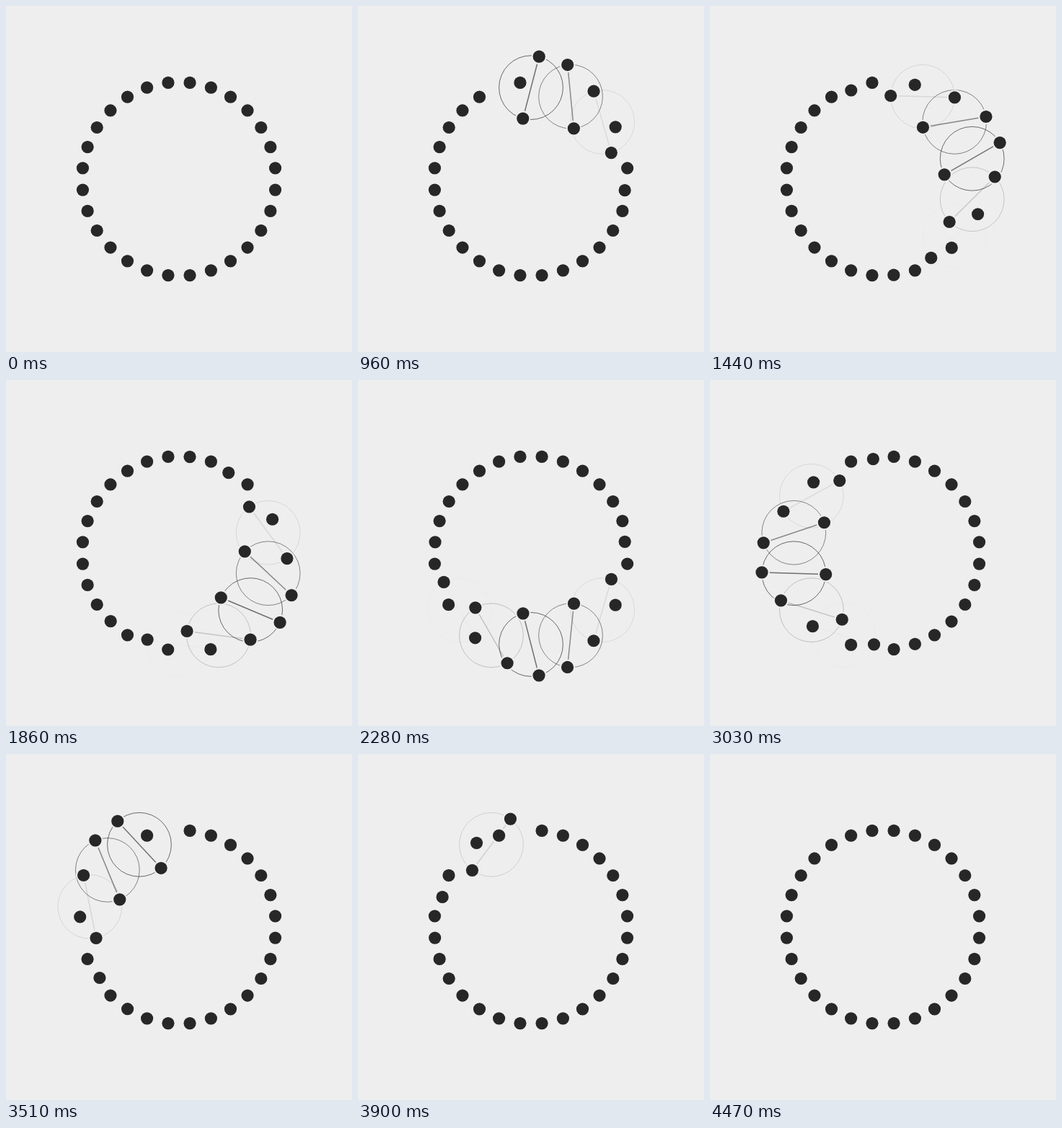
These frames come from a looping animation (480 by 480 pixels, 5.17 s). An HTML page with a canvas:

```html
<!DOCTYPE html>
<html lang="en">
<head>
<meta charset="utf-8">
<title>Swapping dots</title>
<style>
  html, body { margin: 0; width: 100%; height: 100%; overflow: hidden; background: #eee; }
  canvas { display: block; width: 480px; height: 480px; }
</style>
</head>
<body>
<canvas id="stage"></canvas>
<script>
const SIZE = 480, MID = SIZE / 2;
const LOOP = 5170, STEP = 30, MOVE_START = 60, MOVE_END = 4470;
const PAIRS = 14, FIRST = 1, STAGGER = 207, TURN = 1788;
const RING = 134.4, DOT = 8.6, HALO = 10.6;
const BG = '#eee', INK = '#272727';

// Each pair sits three places apart on the ring; its orbit is centred between them.
const UNIT = Math.PI / PAIRS;
const HUB = RING * Math.cos(1.5 * UNIT);
const ORBIT = RING * Math.sin(1.5 * UNIT);

const canvas = document.getElementById('stage');
const ctx = canvas.getContext('2d');
const scale = window.devicePixelRatio || 1;
canvas.width = canvas.height = SIZE * scale;
ctx.scale(scale, scale);

const clamp = x => Math.min(1, Math.max(0, x));
const smooth = x => x * x * (3 - 2 * x);
const ease = x => smooth(smooth(clamp(x)));

function disc(x, y, r, color) {
  ctx.fillStyle = color;
  ctx.beginPath();
  ctx.arc(x, y, r, 0, 2 * Math.PI);
  ctx.fill();
}

function pairAt(i, time) {
  const p = ease((time - FIRST - i * STAGGER) / TURN);
  const around = 2 * i * UNIT;
  const angle = Math.PI + around + p * Math.PI;
  return {
    p,
    x: MID + HUB * Math.sin(around),
    y: MID - HUB * Math.cos(around),
    dx: Math.cos(angle),
    dy: Math.sin(angle)
  };
}

function drawOrbit({ p, x, y, dx, dy }) {
  const fade = Math.sin(Math.PI * p) ** 2;
  if (fade < 0.004) return;
  const reach = ORBIT - HALO;
  ctx.strokeStyle = INK;

  ctx.globalAlpha = 0.72 * fade;
  ctx.lineWidth = 1;
  ctx.beginPath();
  ctx.arc(x, y, ORBIT, 0, 2 * Math.PI);
  ctx.stroke();

  ctx.globalAlpha = 0.68 * fade;
  ctx.lineWidth = 1.5;
  ctx.beginPath();
  ctx.moveTo(x - dx * reach, y - dy * reach);
  ctx.lineTo(x + dx * reach, y + dy * reach);
  ctx.stroke();
  ctx.globalAlpha = 1;
}

function drawDots({ x, y, dx, dy }) {
  for (const side of [ORBIT, -ORBIT]) {
    const px = x + dx * side, py = y + dy * side;
    disc(px, py, HALO, BG);
    disc(px, py, DOT, INK);
  }
}

function draw(ms) {
  let time = Math.floor((ms % LOOP) / STEP) * STEP;
  if (time < MOVE_START || time >= MOVE_END) time = 0;
  const pairs = Array.from({ length: PAIRS }, (_, i) => pairAt(i, time));
  ctx.fillStyle = BG;
  ctx.fillRect(0, 0, SIZE, SIZE);
  pairs.forEach(drawOrbit);
  pairs.forEach(drawDots);
}

const start = performance.now();
function tick() {
  draw(performance.now() - start);
  requestAnimationFrame(tick);
}
tick();
</script>
</body>
</html>
```
